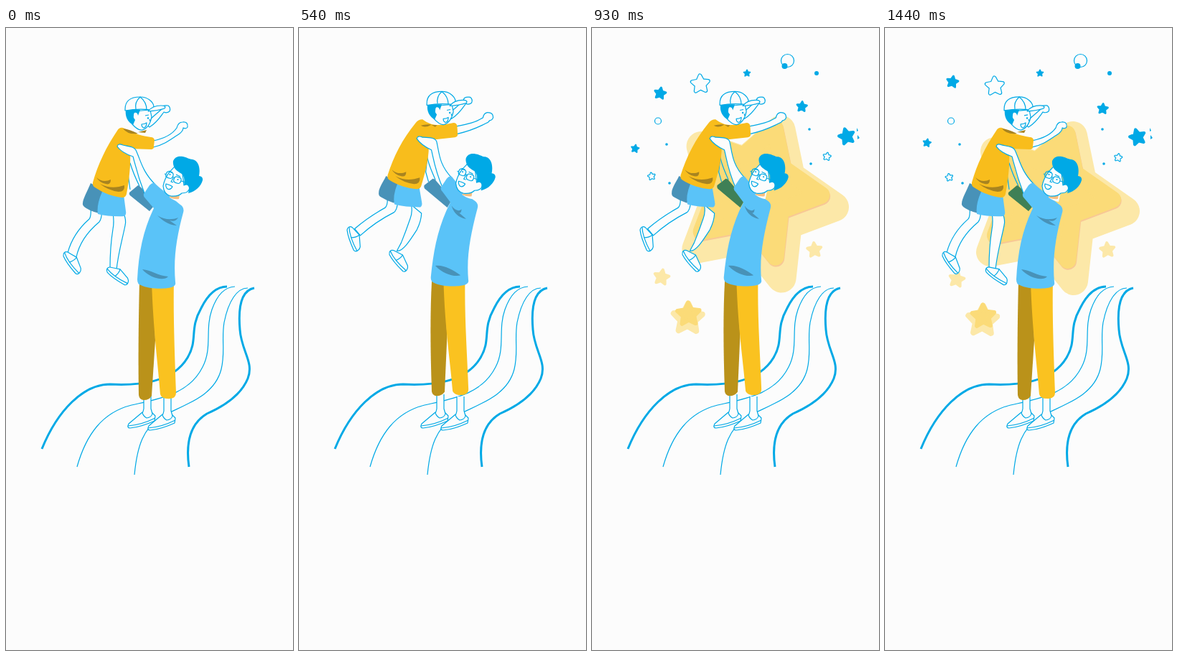
An HTML page for the animation above (1.47 s loop, 400 px wide and 866 px high).

```html
<!DOCTYPE html>
<html lang="en">
<head>
<meta charset="utf-8">
<title>Reach for the stars</title>
<style>
  html, body { margin: 0; width: 100%; height: 100%; overflow: hidden; background: #fcfcfc; }
  svg { display: block; width: 100vw; height: 100vh; }
</style>
</head>
<body>
<svg id="stage" viewBox="0 0 400 866" stroke-linejoin="round"></svg>
<script>
const LOOP = 1470, STEP = 30, POP_START = 540, POP_END = 690, DRIFT_MID = 930, DRIFT_END = 1140;
const LINE = '#00a9e6', BLUE = '#5ac3f8', SHADE = '#4892b8', YELLOW = '#fac220', GOLD = '#f8bd1c',
      BROWN = '#ba921a', CREASE = '#a88420', SKIN = '#fcfcfc', PALE = '#fce8a8', WARM = '#fbdb78';
const stage = document.getElementById('stage');
const updates = [];

const lerp = (a, b, k) => a + (b - a) * k;
const clamp = x => Math.max(0, Math.min(1, x));

function add(parent, tag, attrs = {}) {
  const el = document.createElementNS('http://www.w3.org/2000/svg', tag);
  for (const key in attrs) el.setAttribute(key, attrs[key]);
  return parent.appendChild(el);
}

const draw = (parent, d, fill = 'none', stroke = LINE, width = 1.2) =>
  add(parent, 'path', { d, fill, stroke, 'stroke-width': width });

// Path whose coordinates blend from the low pose to the high pose
function morph(low, high, fill = 'none', stroke = 'none') {
  const el = draw(stage, low, fill, stroke);
  const target = high.match(/-?[\d.]+/g);
  updates.push(s => {
    let i = 0;
    el.setAttribute('d', low.replace(/-?[\d.]+/g, n => lerp(+n, +target[i++], s.lift).toFixed(2)));
  });
  return el;
}

// Group that moves and turns from [x, y, angle] to [x, y, angle]
function move(from, to) {
  const g = add(stage, 'g');
  updates.push(s => {
    const [x, y, a] = from.map((v, i) => lerp(v, to[i], s.lift));
    g.setAttribute('transform', `translate(${x} ${y}) rotate(${a})`);
  });
  return g;
}

// Star with rounded tips, optionally with an outline
function star(parent, r, tilt, fill, outline) {
  const points = Array.from({ length: 10 }, (_, i) => {
    const a = (tilt + i * 36) * Math.PI / 180, reach = r * (i % 2 ? .42 : .84);
    return `${(reach * Math.cos(a)).toFixed(2)},${(reach * Math.sin(a)).toFixed(2)}`;
  });
  const d = `M${points.join('L')}Z`;
  if (outline) draw(parent, d, outline, outline, r * .32 + 1.2);
  draw(parent, d, fill, fill, r * .32 - (outline ? 1.2 : 0));
}

// Group that pops up at the first point and drifts through the others
function pop(points, swell = 1) {
  const g = add(stage, 'g');
  const [a, b = a, c = b] = points;
  updates.push(s => {
    const at = i => s.first < 1 ? lerp(a[i], b[i], s.first) : lerp(b[i], c[i], s.second);
    const size = s.pop * lerp(swell, 1, (s.first + s.second) / 2);
    g.setAttribute('visibility', s.pop > 0 ? 'visible' : 'hidden');
    g.setAttribute('transform', `translate(${at(0)} ${at(1)}) scale(${size})`);
  });
  return g;
}

// Road
draw(stage, 'M50,586C72,532 108,496 145,496C185,498 232,494 253,459C268,434 255,420 272,390C282,370 294,360 308,360', 'none', LINE, 3);
draw(stage, 'M255,611C250,575 258,550 280,537C305,526 328,510 337,488C346,465 328,450 326,420C323,385 330,365 346,362', 'none', LINE, 3);
draw(stage, 'M99,611C112,565 135,535 175,525C215,516 255,510 274,472C288,445 277,420 287,392C295,370 305,361 319,360');
draw(stage, 'M179,622C183,580 192,558 215,542C245,525 290,515 300,475C306,450 300,435 304,410C310,380 322,362 337,362');

// Large star
const BIG = 'M33,-96L46,-33L106,9L42,33L34,106L-9,52L-82,66L-57,0L-76,-74L-16,-53Z';
const big = pop([[230, 235], [229.5, 240], [229, 246]], 1.04);
draw(big, BIG, PALE, PALE, 40);
const core = add(big, 'g', { transform: 'translate(-4 -15) scale(.87)' });
add(core, 'path', { d: BIG, fill: '#f8c795', stroke: '#f8c795', 'stroke-width': 27, transform: 'translate(.8 2)' });
draw(core, BIG, WARM, WARM, 27);

// Small stars: radius, tilt, fill, then the drift points
[
  [9.5, -80, LINE, [106, 86.5], [95, 91], [94, 75]],
  [6.5, -80, LINE, [77.5, 165], [60, 168], [58.5, 160]],
  [5.5, -90, LINE, [216, 63]],
  [8.5, -85, LINE, [295.5, 107.5], [292.5, 109.5], [303.5, 112.5]],
  [13, -105, LINE, [358, 150], [355, 151], [352, 152]],
  [14, -93, SKIN, [149, 75.5], [151, 78], [153, 81]],
  [5.5, -100, SKIN, [81, 205.5], [83, 206.5], [89.5, 208]],
  [5.8, -80, SKIN, [329.5, 178], [327.5, 179], [325, 180.5]],
  [12.5, -80, PALE, [95, 345], [97, 347], [100, 350]],
  [12, -95, PALE, [310, 309]],
].forEach(([r, tilt, fill, ...points]) => star(pop(points), r, tilt, fill, fill === SKIN && LINE));
const pair = pop([[132, 403], [133.5, 404.5], [136, 407.5]]);
star(pair, 25, -88, PALE);
star(add(pair, 'g', { transform: 'translate(1 -6)' }), 19, -92, WARM);

// Dots and rings
[[313, 63, 3], [104, 162, 1.8], [108, 216, 1.8], [303, 141, 1.8], [305, 189, 1.8],
 [272.5, 45.5, 9, 'none'], [268.5, 53, 4], [92, 129.5, 4.5, 'none']].forEach(([x, y, r, fill = LINE]) =>
  add(pop([[x, y]]), 'circle', { r, fill, stroke: fill === 'none' ? LINE : 'none', 'stroke-width': 1.2 }));
draw(pop([[370, 147]]), 'M-1,-8l2,4l-2,1zM0,2l3,4l-3,2z', LINE, 'none');

// Man: far arm
morph('M186,220C180,208 176,198 173,188L170,203L173,225', 'M191,210C185,195 181,188 180,178L178,200L182,212', 'none', LINE);
const farSleeve = morph('M184,219L172,229Q171,232 174,234L200,255L210,243L186,220Z',
  'M187,208L175,217Q174,221 177,223L208,249L214,238L190,209Z', SHADE);
updates.push(s => farSleeve.setAttribute('fill', s.pop > 0 ? '#3f8056' : SHADE));

// Boy: legs and shoes
morph('M118,250Q119,262 116,266C100,280 90,298 86,313L98,319C102,300 112,285 130,270Q134,264 133,255Z',
  'M124,234Q125,243 121,247C105,255 90,263 76,273L83,283C95,275 115,262 133,254Q138,250 138,240Z', SKIN, LINE);
morph('M149,258Q151,270 149,280Q145,305 145,334L154,337C156,315 162,295 166,275Q168,268 164,258Z',
  'M158,244Q160,254 156,263C150,278 142,292 133,305L142,311C152,298 164,282 171,268Q172,258 168,244Z', SKIN, LINE);
for (const shoe of [move([86, 312, 55], [72, 271, 75]), move([145, 333, 36], [129, 305, 54])]) {
  draw(shoe, 'M0,0C-3,2 -3,6 1,8C10,10 22,9 31,8C35,6 33,0 29,-2L13,-6Q7,-3 0,0Z', SKIN);
  draw(shoe, 'M-2,4C8,7 22,6 33,4M13,-6Q15,-1 13,6');
}

// Boy: shorts, far arm, near arm, shirt
morph('M118,216C114,226 107,238 107,244Q106,248 112,251Q120,256 130,258L136,226Z',
  'M122,204C118,212 112,220 112,226Q111,231 116,233Q124,238 133,241L140,215Z', SHADE);
morph('M134,228Q126,246 128,259Q145,263 165,262Q168,260 167,255L164,232Z',
  'M138,214Q131,232 134,243Q150,247 170,247Q173,245 172,240L168,218Z', BLUE);
draw(move([0, 0, 0], [15, -14, 0]),
  'M194,133L217,113Q216,107 226,108Q230,111 228,116Q224,119 220,117C215,124 210,132 200,138Z', SKIN);
morph('M238,139Q240,131 246,131Q254,130 253,138Q251,141 247,139Q247,143 242,147C230,155 220,163 205,166L205,157C220,154 232,148 238,139Z',
  'M260,122Q261,116 266,115Q274,115 274,122Q273,126 269,127Q268,129 264,130C252,136 240,140 223,144L222,133C238,130 250,128 260,122Z', SKIN, LINE);
draw(move([0, 0, 0], [13, -10, 0]), 'M177,132L178,149L198,150L193,138Z', SKIN, 'none');
morph('M163,139Q158,138 155,143C140,165 128,190 121,215Q120,220 124,222C136,230 150,235 162,236Q167,236 168,231C172,210 174,190 173,168L203,169Q207,168 206,164L207,156Q206,152 202,152C190,150 180,148 163,139Z',
  'M174,125Q168,125 164,130C145,152 132,178 124,203Q123,208 127,210C138,217 152,221 164,222Q170,222 171,217C178,195 184,175 182,154L220,149Q225,148 224,144L223,132Q222,128 218,128C205,131 190,138 174,125Z', GOLD);
morph('M163,140Q172,141 184,147Q170,149 163,140ZM184,145L196,142L194,146Z',
  'M171,135Q178,132 185,132Q177,138 171,135ZM185,133L192,134L189,136Z', CREASE);
const folds = move([0, 0, 0], [4, -13, 0]);
draw(folds, 'M126,208C132,214 140,214 146,211Q146,219 139,217Q130,215 126,208Z', CREASE, 'none');
draw(folds, 'M131,217C145,224 155,222 165,219Q166,228 157,228Q142,226 131,217Z', CREASE, 'none');

// Boy: head
const boy = move([0, 0, 0], [14.5, -9, 0]);
draw(boy, 'M178,116L176,134Q184,143 190,142Q200,139 203,124L201,114Z', SKIN);
draw(boy, 'M167,113Q165,128 177,135L180,128Q175,122 179,118Q183,117 184,122L187,114Z', LINE, 'none');
draw(boy, 'M166,113C166,100 176,96 187,96C198,96 205,103 206,109L203,114Q184,112 166,115Z', SKIN);
draw(boy, 'M187,96Q179,103 181,113M187,96Q196,103 196,114');
draw(boy, 'M198,116Q204,108 216,108Q224,108 221,112Q212,115 198,116Z', SKIN);
draw(boy, 'M189,134Q193,134 196,132Q196,138 192,139Q189,138 189,134ZM194,122L199,121M200,127L201,130');
add(boy, 'circle', { cx: 198, cy: 125.5, r: 1.2, fill: LINE });

// Man: shoes and ankles, trousers
for (const offset of ['0 0', '28 3']) {
  const foot = add(stage, 'g', { transform: `translate(${offset})` });
  draw(foot, 'M190,535L171,551Q168,557 173,557C185,556 196,552 207,547L208,540L204,536Z', SKIN);
  draw(foot, 'M192,510L192,530Q191,535 190,536Q192,541 196,543Q203,542 204,537L202,530L202,510', SKIN);
  draw(foot, 'M170,554C184,553 196,549 208,543');
}
morph('M186,352L206,352L208,435L203,512Q200,518 192,518Q186,518 185,511C184,450 185,400 186,352Z',
  'M185,350L203,350L206,430L203,505Q200,511 192,511Q186,511 185,505C183,450 182,400 185,350Z', BROWN);
morph('M203,352L234,352C233,400 235,450 237,508Q237,515 229,516Q217,517 215,510C212,470 205,420 203,352Z',
  'M201,350L231,350C230,400 234,450 236,502Q236,509 228,510Q217,511 214,505C211,465 203,420 201,350Z', YELLOW);

// Man: near arm, torso, creases
morph('M194,233C183,205 180,190 177,179C168,176 160,172 155,165Q156,160 163,163C172,165 178,165 181,170C188,185 190,200 208,218',
  'M202,222C190,195 189,180 186,168C178,164 170,158 166,152Q167,147 174,150C184,150 192,150 194,156C197,172 196,188 214,207', SKIN, LINE);
morph('M207,216Q204,215 200,219L192,231Q191,234 194,237L206,251C192,280 185,310 183,350Q183,357 188,358C200,364 225,364 233,360Q237,358 236,354C233,320 238,290 247,257Q249,250 243,246C236,240 225,232 207,216Z',
  'M214,205Q210,204 207,208L199,220Q198,223 201,226L212,241C194,275 188,310 184,345Q183,352 188,354C200,360 225,360 233,356Q237,354 236,350C233,316 240,285 249,250Q251,244 246,240C238,235 226,222 214,205Z', BLUE);
morph('M190,336C202,337 212,345 226,346C220,353 200,348 190,336Z', 'M190,330C202,328 215,335 225,344C216,346 200,341 190,330Z', SHADE);
morph('M211,261C222,268 232,267 240,264C236,270 232,269 228,268L238,275C226,274 218,268 211,261Z',
  'M213,245C216,251 221,254 224,250C224,255 223,256 222,255L232,264C221,262 215,255 213,245Z', SHADE);

// Man: head
const man = move([0, 0, 0], [-.5, -4.5, 0]);
draw(man, 'M230,231L228,236Q235,241 242,242L245,228Z', SKIN, 'none');
draw(man, 'M229,233Q236,236 242,231L241,238Q235,239 228,236Z', '#f8bf80', 'none');
draw(man, 'M235,193C230,198 222,205 219,220Q220,232 230,234Q240,235 245,230Q255,230 256,222Q254,216 248,219L246,203Z', SKIN);
draw(man, 'M234,193Q230,182 240,179C250,178 254,183 260,183C269,185 271,196 269,206Q275,207 274,212C272,220 264,228 254,230Q257,219 251,218L248,219Q250,208 245,203C240,200 236,198 234,193Z', LINE, 'none');
draw(man, 'M223,217Q230,219 232,221Q229,226 225,224Q222,221 223,217ZM233,209L230,214L233,215M227,199L232,201M237,204L243,207');
for (const [x, y] of [[228, 204.5], [239, 211.5]]) {
  add(man, 'rect', { x: x - 5, y: y - 4, width: 10, height: 8.5, rx: 3.5, fill: 'none', stroke: LINE, 'stroke-width': 1.2, transform: `rotate(18 ${x} ${y})` });
  add(man, 'circle', { cx: x + .5, cy: y - .5, r: 1.1, fill: LINE });
}
draw(man, 'M232,207L235,209M244,213L251,215M221,203L223,204');

function frame() {
  const step = Math.floor(performance.now() % LOOP / STEP);
  const t = step < 2 ? 0 : step * STEP;
  const state = {
    lift: (1 - Math.cos(2 * Math.PI * t / LOOP)) / 2,
    pop: clamp((t - POP_START) / (POP_END - POP_START)),
    first: clamp((t - POP_END) / (DRIFT_MID - POP_END)),
    second: clamp((t - DRIFT_MID) / (DRIFT_END - DRIFT_MID)),
  };
  updates.forEach(update => update(state));
  requestAnimationFrame(frame);
}
frame();
</script>
</body>
</html>
```
